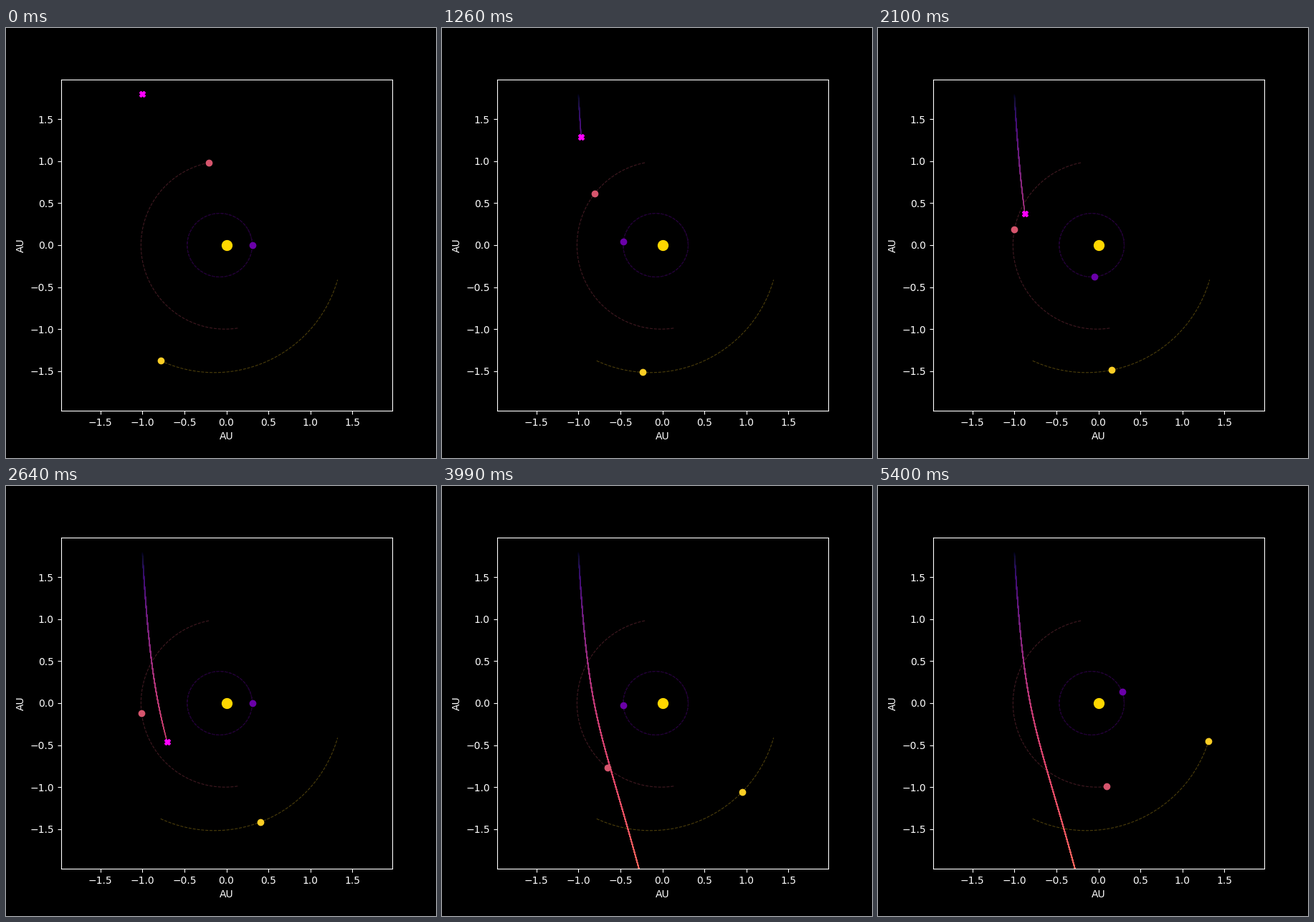
A matplotlib script that plays this animation: 600x600 px, repeating every 5.43 s.

```python
import numpy as np
import matplotlib.pyplot as plt
from matplotlib.animation import FuncAnimation
from matplotlib.collections import LineCollection

FRAMES = 181      # one day per frame
INTERVAL = 30     # ms
LIMIT = 1.971     # half width of the view, AU
OVERLAYS = 30     # trails painted over each other
MU = 2.91e-4      # solar gravity, AU^3 / day^2
THRUST = np.array([0, -4.98e-4])

# semi-major axis, eccentricity, period in days, starting mean anomaly in degrees
PLANETS = [
    (0.3871, 0.2056, 87.97, 0),
    (1.0000, 0.0167, 365.25, 100.1),
    (1.5237, 0.0934, 686.98, 250),
]


def kepler(t, a, e, period, start):
    """Position on an ellipse with the Sun at the origin, perihelion on +x."""
    mean = np.radians(start) + 2 * np.pi * t / period
    ecc = mean + e * np.sin(mean)
    for _ in range(8):
        ecc -= (ecc - e * np.sin(ecc) - mean) / (1 - e * np.cos(ecc))
    return a * (np.cos(ecc) - e), a * np.sqrt(1 - e * e) * np.sin(ecc)


def accel(p):
    return THRUST - MU * p / np.hypot(*p) ** 3


def fly(days):
    """Leapfrog flight under solar gravity and constant thrust."""
    p, v = np.array([-1.0, 1.8]), np.array([0, -3.8e-4])
    path, speed = [p], [np.hypot(*v)]
    for _ in range(days):
        v = v + accel(p) / 2
        p = p + v
        v = v + accel(p) / 2
        path.append(p)
        speed.append(np.hypot(*v))
    return np.array(path), np.array(speed)


plt.style.use("dark_background")
fig, ax = plt.subplots(figsize=(6, 6), dpi=100)
ax.set_aspect("equal")
ax.set(xlim=(-LIMIT, LIMIT), ylim=(-LIMIT, LIMIT), xlabel="AU", ylabel="AU")
ticks = np.arange(-1.5, 1.6, 0.5)
ax.set_xticks(ticks)
ax.set_yticks(ticks)

days = np.arange(FRAMES, dtype=float)
span = np.linspace(0, 182.6, 184)
colors = plt.cm.plasma(np.linspace(0.2, 0.9, len(PLANETS)))

ax.plot(0, 0, "o", color="gold", ms=10)
orbits, dots = [], []
for planet, color in zip(PLANETS, colors):
    ax.plot(*kepler(span, *planet), "--", color=color, lw=0.8, alpha=0.3)
    dots += ax.plot([], [], "o", color=color, ms=6, zorder=3)
    orbits.append(np.column_stack(kepler(days, *planet)))

path, speed = fly(FRAMES - 1)
segments = np.stack([path[:-1], path[1:]], axis=1)
norm = plt.Normalize(0, speed.max())
shown = np.count_nonzero(path[:, 1] > -LIMIT) + 1

trails = []
for n in range(1, FRAMES):
    k = min(n, shown)
    trail = LineCollection(segments[:k], cmap="magma", norm=norm,
                           linewidths=1, visible=False)
    trail.set_array(speed[1:k + 1])
    trails.append(ax.add_collection(trail, autolim=False))

ship, = ax.plot([], [], "X", color="magenta", ms=6, zorder=4)


def update(i):
    for dot, orbit in zip(dots, orbits):
        dot.set_data(orbit[i, :1], orbit[i, 1:])
    # stacked copies harden the trail's soft edges as it ages
    for n, trail in enumerate(trails, 1):
        trail.set_visible(i - OVERLAYS < n <= i)
    ship.set_data(path[i, :1], path[i, 1:])
    return [*dots, *trails, ship]


anim = FuncAnimation(fig, update, frames=FRAMES, interval=INTERVAL,
                     repeat=True, repeat_delay=0)
plt.show()
```
